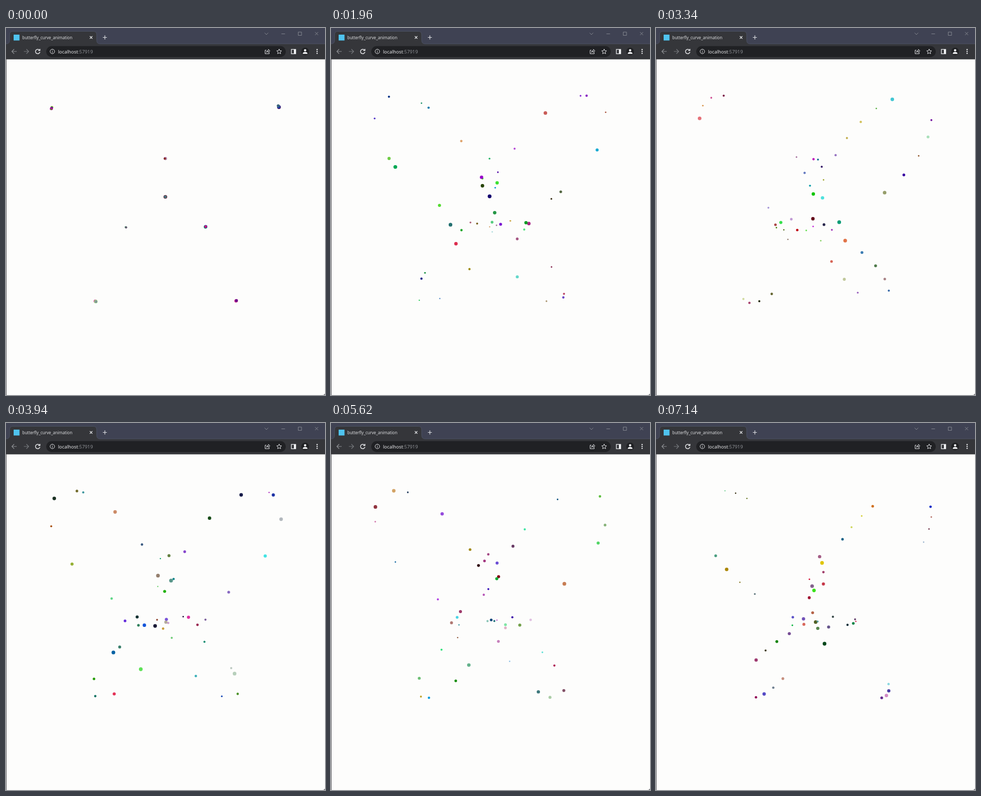
An HTML page with a canvas that plays this animation: 626x720 px, repeating every 7160 ms.

```html
<!DOCTYPE html>
<html lang="en">
<head>
<meta charset="utf-8">
<title>Butterfly curve</title>
<style>
  html, body { margin: 0; width: 100%; height: 100%; overflow: hidden; background: #fdfdfc; }
  svg, canvas { position: absolute; left: 0; top: 0; display: block; }
  text { font-family: "Open Sans", "Noto Sans", sans-serif; }
</style>
</head>
<body>
<svg width="626" height="720" viewBox="0 0 626 720" fill="none">
  <!-- window and tab strip -->
  <rect width="626" height="31" fill="#3f4253"/>
  <path d="M0 31H1Q7 31 7 24V13Q7 6 14 6H171Q178 6 178 13V24Q178 31 184 31H626V61.5H0Z" fill="#35363a"/>
  <path d="M0 31H1Q7 31 7 24V13Q7 6.500 14 6.500H171Q178 6.500 178 13V24Q178 31 184 31H626" stroke="#4c5264"/>
  <rect x="79" y="35.5" width="470" height="21.5" rx="10.7" fill="#202124"/>
  <path d="M.5 61V720" stroke="#55565a"/>
  <path d="M626 716V720H621Q626 720 626 716Z" fill="#55565a"/>
  <rect x="15" y="13" width="11.5" height="11.5" fill="#4fc3ee"/>
  <text x="32" y="21.5" font-size="8.05" fill="#e6e7ea">butterfly_curve_animation</text>
  <text x="102" y="49.7" font-size="9.4" fill="#f4f5f7">localhost<tspan fill="#95989d">:57919</tspan></text>
  <g stroke="#e2e3e6" stroke-width="1.2">
    <path d="M164.5 16L169.5 21M169.5 16L164.5 21M190 18.5H198M194 14.5V22.5"/>
    <path d="M21 46H11.5M16 41.5L11.5 46L16 50.5" stroke="#8e9094"/>
    <path d="M35 46H44.5M40 41.5L44.5 46L40 50.5" stroke="#77797d"/>
    <path d="M65.5 43A4.4 4.4 0 1 0 66.6 47M66.6 41V44.3H63.2" stroke-width="1.5"/>
    <circle cx="91" cy="46" r="4.4" stroke-width="1"/>
    <path d="M91 45.5V48.5M91 43.2V44.3" stroke-width="1"/>
    <path d="M511 43.5H508.5V50.5H516.5V48M511 48Q511.5 44 515 44V41.8L518 45L515 48V46Q512.5 46 511 48" stroke-width="1"/>
    <path d="M536 41.3L537.4 44.6L540.8 44.8L538.2 47.1L539 50.6L536 48.7L533 50.6L533.8 47.1L531.2 44.8L534.6 44.6Z" stroke-width="1"/>
    <rect x="560" y="42" width="8.5" height="8.5" stroke-width="1.4"/>
  </g>
  <circle cx="587" cy="46" r="7.5" fill="#202124"/>
  <g fill="#f2f3f5">
    <path d="M565 42H569V51H565Z"/>
    <circle cx="587" cy="43.8" r="2.3"/>
    <path d="M582.5 50.8V49.500Q583 47 587 47T591.500 49.500V50.800Z"/>
    <circle cx="610.5" cy="42.3" r="1.2"/>
    <circle cx="610.5" cy="46" r="1.2"/>
    <circle cx="610.5" cy="49.7" r="1.2"/>
  </g>
  <path d="M507.5 9.5L511 13L514.5 9.5M540.5 11.5H547.5M573.5 8H580V14.5H573.5ZM606.5 8L612.5 14M612.5 8L606.5 14" stroke="#83868f"/>
</svg>
<canvas width="626" height="720"></canvas>
<script>
const ctx = document.querySelector('canvas').getContext('2d');
const LOOP = 7160, DOTS = 50;

// Angle between neighbouring dots, in degrees, growing over the steps of the loop
const keys = [[0, 314.987], [26, 616.663], [58, 955.876], [85, 1280.891],
              [100, 1487.759], [121, 1766.127], [153, 2187.474]];

function spacing(n) {
  const k = Math.max(1, keys.findIndex(key => key[0] >= n));
  const [n0, a] = keys[k - 1], [n1, b] = keys[k];
  return (a + (b - a) * (n - n0) / (n1 - n0)) * Math.PI / 180;
}

// Steps last 20, 100 and 20 ms in turn
function stepAt(ms) {
  const rest = ms % 140;
  return 3 * Math.floor(ms / 140) + (rest >= 20) + (rest >= 120);
}

function randomizer(seed) {
  return () => {
    seed = seed + 0x6D2B79F5 | 0;
    let x = Math.imul(seed ^ seed >>> 15, 1 | seed);
    x = x + Math.imul(x ^ x >>> 7, 61 | x) ^ x;
    return ((x ^ x >>> 14) >>> 0) / 2 ** 32;
  };
}

function butterfly(t) {
  const r = Math.exp(Math.cos(t)) - 2 * Math.cos(4 * t);
  return [313 + 78.25 * r * Math.sin(t), 390.5 - 82.4 * r * Math.cos(t)];
}

// Every step gives the dots fresh colours and sizes
function draw(n) {
  const random = randomizer(n * 977 + 5), gap = spacing(n);
  const channel = () => Math.floor(random() * 230);
  ctx.clearRect(0, 0, 626, 720);
  for (let i = 1; i <= DOTS; i++) {
    ctx.fillStyle = `rgb(${channel()},${channel()},${channel()})`;
    ctx.beginPath();
    ctx.arc(...butterfly(i * gap), 1.2 + 2.5 * random(), 0, 2 * Math.PI);
    ctx.fill();
  }
}

let shown = -1;
function tick() {
  const n = stepAt(performance.now() % LOOP);
  if (n !== shown) draw(shown = n);
  requestAnimationFrame(tick);
}
tick();
</script>
</body>
</html>
```
